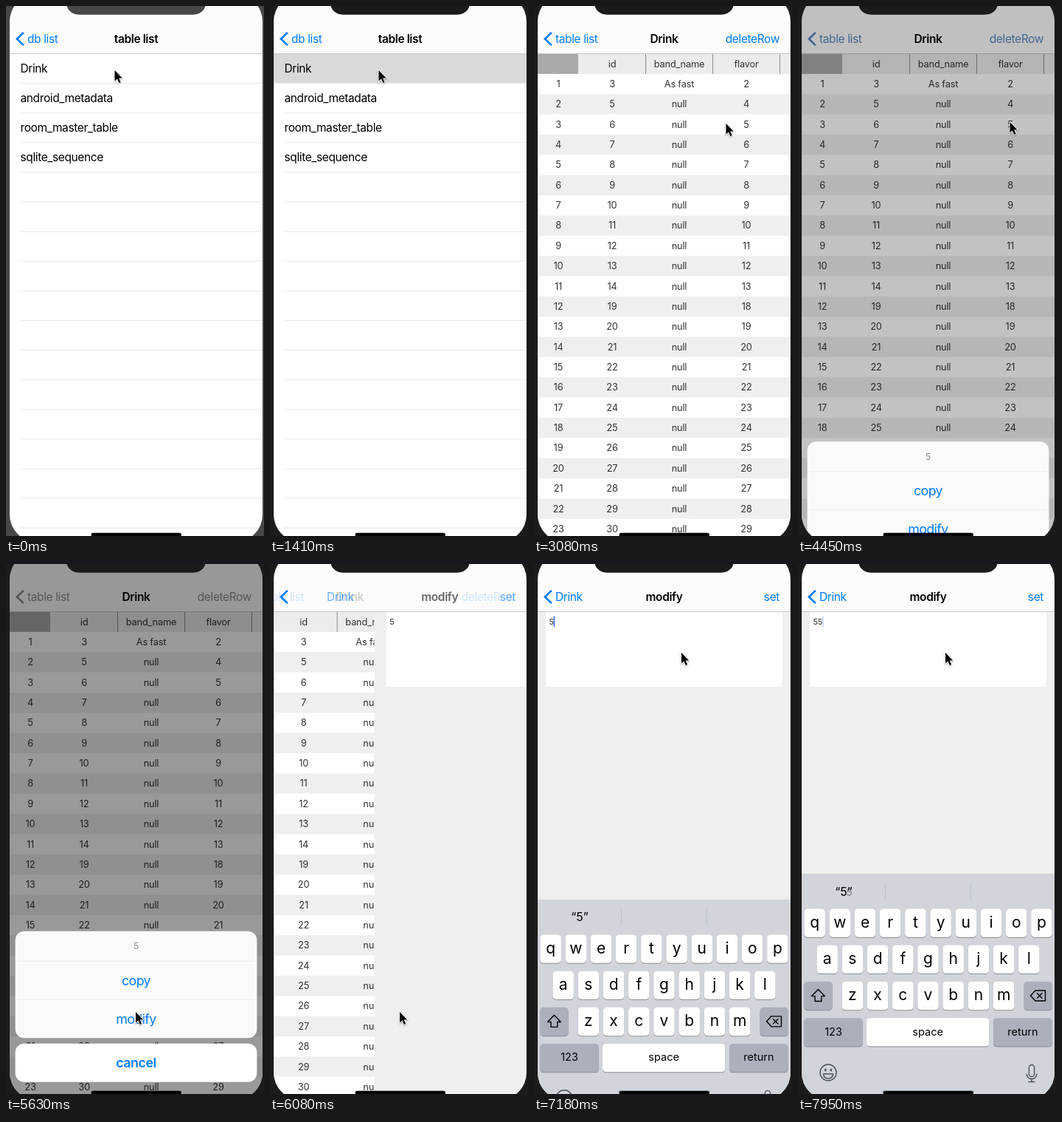
These frames come from a looping animation (350x717 px, 8000 ms). An HTML page with a canvas:

```html
<!DOCTYPE html>
<html lang="en">
<head>
<meta charset="utf-8">
<title>Table browser</title>
<style>
html, body { margin: 0; width: 100%; height: 100%; overflow: hidden; background: #1b1b1b; }
canvas { display: block; width: 350px; height: 717px; }
</style>
</head>
<body>
<canvas id="stage"></canvas>
<script>
const W = 350, H = 717, LOOP = 8000;
const SCREEN = { x: 5, y: -15.8, w: 343, h: 740.6, r: 36.5 };
const BAR = 64.5, ROW = 40.1, CELL = 27.36, MID = 176.5;
const BLUE = [0, 122, 255], MUTED = [142, 142, 147];
const LINK = `rgb(${BLUE})`;
const canvas = document.getElementById('stage');
const g = canvas.getContext('2d');
const dpr = window.devicePixelRatio || 1;
canvas.width = W * dpr;
canvas.height = H * dpr;

// When each part starts to move
const at = { press: 1410, openTable: 1480, sheetUp: 4371, tap: 5580, sheetDown: 5670, openEditor: 5940, keyboard: 6905, type: 7950 };

const home = { x: 147.5, y: 87 };
const glides = [
  { from: 1980, to: 2650, x: 135, y: 187 },
  { from: 2650, to: 3080, x: 260.5, y: 159 },
  { from: 3440, to: 3910, x: 287.5, y: 157 },
  { from: 4540, to: 4630, x: 262, y: 270 },
  { from: 4780, to: 4930, x: 197, y: 605 },
  { from: 5100, to: 5340, x: 176, y: 606 },
  { from: 6380, to: 6640, x: 200, y: 120 }
];

const lerp = (a, b, p) => a + (b - a) * p;
const clamp = v => Math.max(0, Math.min(1, v));
const mix = (a, b, p) => `rgb(${a.map((v, i) => Math.round(lerp(v, b[i], p)))})`;

// Critically damped spring that comes to rest at 1
function spring(t, start, speed) {
  const x = Math.max(0, t - start) * speed;
  return x > 6.4 ? 1 : 1 - (1 + x) * Math.exp(-x);
}

function rect(x, y, w, h, color) {
  g.fillStyle = color;
  g.fillRect(x, y, w, h);
}

function round(x, y, w, h, r, color) {
  g.fillStyle = color;
  g.beginPath();
  g.roundRect(x, y, w, h, r);
  g.fill();
}

function text(str, x, y, size, o = {}) {
  g.font = `${o.weight || 400} ${size}px Inter, sans-serif`;
  g.letterSpacing = (o.spacing ?? -0.025) * size + 'px';
  g.textAlign = o.align || 'center';
  g.fillStyle = o.color || '#000';
  g.fillText(str, x, y);
}

function line(points, width, color, close) {
  g.beginPath();
  points.forEach(([x, y]) => g.lineTo(x, y));
  if (close) g.closePath();
  g.lineWidth = width;
  g.strokeStyle = color;
  g.stroke();
}

function shifted(dx, dy, draw) {
  g.save();
  g.translate(dx, dy);
  draw();
  g.restore();
}

function faded(alpha, draw) {
  g.save();
  g.globalAlpha = clamp(alpha);
  draw();
  g.restore();
}

const pages = {
  list: {
    title: 'table list', back: 'db list', right: '',
    draw(t) {
      rect(0, BAR, W, H, '#fff');
      if (t >= at.press) rect(0, BAR, W, ROW, '#d9d9d9');
      for (let i = 1; i <= 16; i++) rect(19, BAR + ROW * i - 0.5, W, 1, '#e6e6e8');
      ['Drink', 'android_metadata', 'room_master_table', 'sqlite_sequence'].forEach((name, i) =>
        text(name, 19.5, 90 + ROW * i, 15.5, { align: 'left' }));
    }
  },
  table: {
    title: 'Drink', back: 'table list', right: 'deleteRow',
    draw() {
      const colX = i => i ? 15 + 91 * i : 33;
      const putRow = (values, y) => values.forEach((v, i) =>
        text(String(v), colX(i), y + 18.1, 12.8, { color: '#333', spacing: -0.015 }));
      rect(0, BAR, W, H, '#fff');
      rect(0, BAR, W, CELL, '#ececec');
      rect(0, BAR, 60, CELL, '#a9a9a9');
      for (let x = 151; x < W; x += 91) rect(x, BAR, 1, CELL, '#8e8e8e');
      putRow(['', 'id', 'band_name', 'flavor'], BAR);
      for (let n = 1; n <= 24; n++) {
        const y = BAR + CELL * n;
        const id = n === 1 ? 3 : n < 12 ? n + 3 : n + 7;
        if (n % 2 === 0) rect(0, y, W, CELL, '#efefef');
        putRow([n, id, n === 1 ? 'As fast' : 'null', id - 1], y);
      }
    }
  },
  editor: {
    title: 'modify', back: 'Drink', right: 'set',
    draw(t) {
      const typed = t >= at.type;
      rect(0, BAR, W, H, '#efefef');
      rect(16, BAR, 321, 101.5, '#fff');
      text(typed ? '55' : '5', 20.5, 82, 11, { align: 'left', color: '#333' });
      if (t < at.keyboard) return;
      const glow = typed ? 0.3 : 1 - clamp((t - 7480) / 180);
      faded(glow, () => rect(typed ? 33 : 26.5, 71, 1.6, 14, '#3f66e0'));
    }
  }
};

function barItem(page, color, p, leaving) {
  const titleX = leaving ? lerp(MID, 60, p) : lerp(MID + 130, MID, p);
  const backX = leaving ? lerp(29, -40, p) : lerp(145, 29, p);
  faded(leaving ? 1 - p * 1.4 : p, () => {
    text(page.title, titleX, 50, 15.5, { weight: 600 });
    text(page.back, backX, 50, 15.5, { align: 'left', color });
    text(page.right, 333, 50, 15.5, { align: 'right', color });
  });
}

function drawPages(t, from, to, p, tint) {
  const color = mix(BLUE, MUTED, tint);
  if (p < 1) shifted(-0.3 * SCREEN.w * p, 0, () => from.draw(t));
  if (p > 0) shifted(SCREEN.w * (1 - p), 0, () => to.draw(t));
  rect(0, -20, W, BAR + 20, '#fcfcfc');
  rect(0, BAR - 0.5, W, 1, '#c9c9cb');
  g.lineCap = 'butt';
  g.lineJoin = 'miter';
  line([[23.8, 35.9], [14.9, 44.5], [23.8, 53.1]], 2.7, color);
  if (p < 1) barItem(from, color, p, true);
  if (p > 0) barItem(to, color, p, false);
}

function drawSheet(t, p) {
  if (p <= 0) return;
  const x = 12.6, w = 327.8, top = 496.8, row = 52, bottom = 641.3;
  rect(0, -20, W, H + 40, `rgba(0,0,0,${0.4 * p})`);
  shifted(0, 228 * (1 - p), () => {
    round(x, top, w, bottom - top, 12, '#fafafa');
    if (t >= at.tap && t < at.tap + 50) round(x, bottom - row, w, row, [0, 0, 12, 12], '#e4e4e6');
    text('5', MID, 521.3, 12, { color: '#8f8f8f' });
    ['modify', 'copy'].forEach((name, i) => {
      const y = bottom - row * (i + 1);
      rect(x, y - 0.5, w, 0.8, '#e6e6e6');
      text(name, MID, y + 32.3, 17.8, { color: LINK, spacing: -0.035 });
    });
    round(x, bottom + 7.4, w, row, 12, '#fff');
    text('cancel', MID, bottom + 39.7, 17.8, { color: LINK, weight: 600 });
  });
}

function key(x, y, w, label = '', size = 21, color = '#fff') {
  round(x, y + 1, w, 38.3, 4.6, '#8b8e94');
  round(x, y, w, 38.3, 4.6, color);
  text(label, x + w / 2, y + 19 + size * 0.3, size, { spacing: 0 });
}

function drawFace(x, y) {
  g.strokeStyle = g.fillStyle = '#50555c';
  g.lineWidth = 1.5;
  g.beginPath();
  g.arc(x, y, 11, 0, 7);
  g.stroke();
  [-3.8, 3.8].forEach(d => {
    g.beginPath();
    g.ellipse(x + d, y - 3.5, 1.4, 2, 0, 0, 7);
    g.fill();
  });
  g.beginPath();
  g.arc(x, y + 1.8, 6.5, 0, Math.PI);
  g.closePath();
  g.stroke();
}

function drawMic(x, y) {
  g.strokeStyle = '#50555c';
  g.lineWidth = 1.4;
  g.beginPath();
  g.roundRect(x - 3.6, y - 11.5, 7.2, 16, 3.6);
  g.stroke();
  g.beginPath();
  g.arc(x, y + 1, 6.8, Math.PI, 0, true);
  g.moveTo(x, y + 8);
  g.lineTo(x, y + 11.5);
  g.moveTo(x - 4, y + 11.5);
  g.lineTo(x + 4, y + 11.5);
  g.stroke();
}

function drawShift(x, y) {
  const half = [[0, -8.5], [8.8, 0.6], [4.4, 0.6], [4.4, 7.5]];
  const mirrored = half.map(([a, b]) => [-a, b]).reverse();
  shifted(x, y, () => line([...half, ...mirrored], 1.4, '#000', true));
}

function drawDelete(x, y) {
  shifted(x, y, () => {
    line([[-10, 0], [-3.5, -7], [10, -7], [10, 7], [-3.5, 7]], 1.4, '#000', true);
    [-1, 1].forEach(s => line([[-1, -3.2 * s], [5.5, 3.2 * s]], 1.4, '#000'));
  });
}

function drawKeyboard(t) {
  const p = spring(t, at.keyboard, 0.0135);
  if (p <= 0) return;
  const grey = '#abb0bb', pitch = 34.2;
  const rowY = row => 466.6 + 49.2 * row;
  shifted(0, 306 * (1 - p), () => {
    rect(0, 419, W, 320, '#d1d4db');
    [118, 233.5].forEach(x => rect(x, 432, 1, 22, '#bec2c9'));
    text('“5”', 62, 448.5, 16, { spacing: 0 });
    if (t >= at.type) faded(0.45, () => text('5', 69.5, 448.5, 13));
    ['qwertyuiop', 'asdfghjkl', 'zxcvbnm'].forEach((letters, row) => {
      const left = MID - pitch * letters.length / 2 + 2.9;
      [...letters].forEach((c, i) => key(left + pitch * i, rowY(row), 28.4, c));
    });
    [8.3, 306.6].forEach(x => key(x, rowY(2), 38.2, '', 0, grey));
    key(8.3, rowY(3), 79.5, '123', 14.5, grey);
    key(93, rowY(3), 166.3, 'space', 14.5);
    key(265, rowY(3), 79.8, 'return', 14.5, grey);
    g.lineJoin = g.lineCap = 'round';
    drawShift(27.4, 584);
    drawDelete(325.5, 584);
    drawFace(41, 688);
    drawMic(317, 689);
  });
}

function drawPointer(t) {
  const tip = glides.reduce((pos, m) => {
    const p = clamp((t - m.from) / (m.to - m.from));
    return { x: lerp(pos.x, m.x, p), y: lerp(pos.y, m.y, p) };
  }, home);
  shifted(tip.x, tip.y, () => {
    g.lineJoin = 'round';
    g.shadowColor = 'rgba(0,0,0,.35)';
    g.shadowBlur = 2 * dpr;
    g.shadowOffsetY = dpr;
    line([[0, 0], [0, 14.5], [3.3, 11.4], [5.8, 17], [8.1, 16], [5.7, 10.6], [10.2, 10.4]], 1.8, '#fff', true);
    g.shadowColor = 'transparent';
    g.fillStyle = '#000';
    g.fill();
  });
}

function drawNotch(color) {
  const half = 94.2, depth = 11.8;
  g.fillStyle = color;
  g.beginPath();
  g.moveTo(MID - half, -2);
  g.bezierCurveTo(MID - half + 0.5, 6, MID - half + 8, depth, MID - half + 18, depth);
  g.lineTo(MID + half - 18, depth);
  g.bezierCurveTo(MID + half - 8, depth, MID + half - 0.5, 6, MID + half, -2);
  g.fill();
}

function draw(t) {
  const bezel = t < at.press ? '#474747' : '#1c1b1c';
  const sheet = spring(t, at.sheetUp, 0.025) - spring(t, at.sheetDown, 0.025);
  g.setTransform(dpr, 0, 0, dpr, 0, 0);
  rect(0, 0, W, H, bezel);
  g.save();
  g.beginPath();
  g.roundRect(SCREEN.x, SCREEN.y, SCREEN.w, SCREEN.h, SCREEN.r);
  g.clip();
  if (t < at.sheetUp) drawPages(t, pages.list, pages.table, spring(t, at.openTable, 0.0125), 0);
  else drawPages(t, pages.table, pages.editor, spring(t, at.openEditor, 0.014), sheet);
  drawSheet(t, sheet);
  drawKeyboard(t);
  round(115.5, 712.7, 122.5, 4.8, 2.4, '#000');
  g.restore();
  drawNotch(bezel);
  drawPointer(t);
}

function frame(now) {
  draw(now % LOOP);
  requestAnimationFrame(frame);
}
requestAnimationFrame(frame);
</script>
</body>
</html>
```
